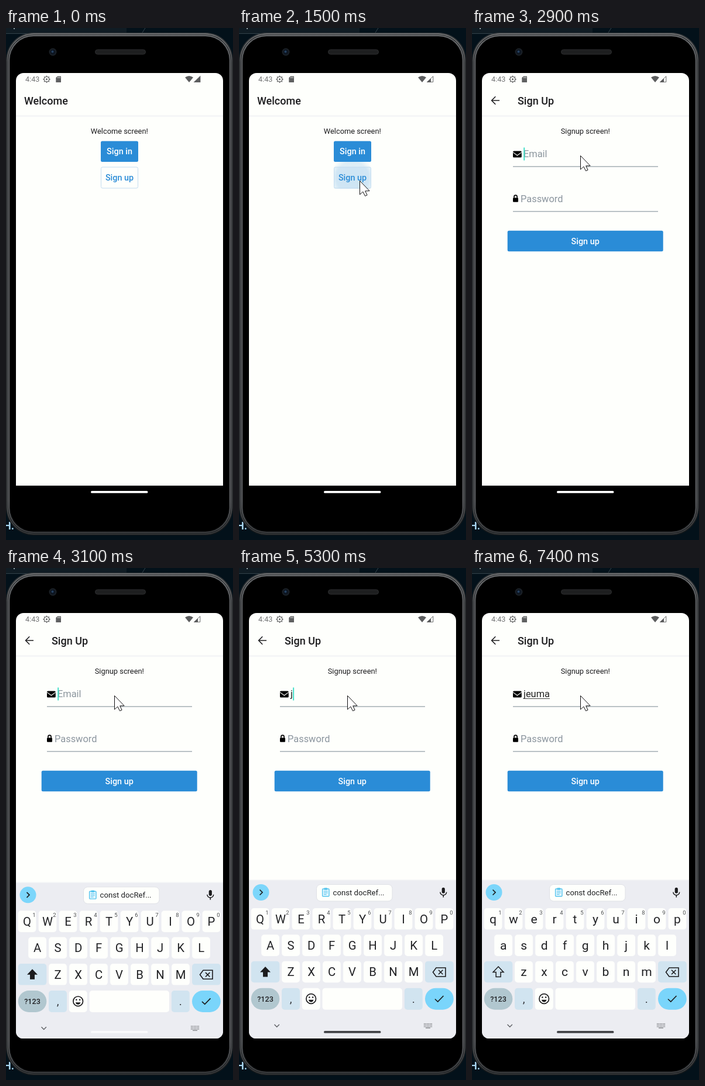
These frames come from a looping animation (388 px wide and 876 px high, 8 s). An HTML page with a canvas:

```html
<!DOCTYPE html>
<html lang="en">
<head>
<meta charset="utf-8">
<title>Phone sign-up</title>
<style>
html, body { margin: 0; width: 100%; height: 100%; overflow: hidden; background: #03111a; }
canvas { display: block; width: 388px; height: 876px; }
</style>
</head>
<body>
<canvas id="stage"></canvas>
<script>
const W = 388, H = 876, LOOP = 8000, STEP = 100;
const PAPER = '#fefffc', INK = '#1c1c1e', BLUE = '#2a8cd7', GREY = '#8b959e';
const canvas = document.getElementById('stage');
const dpr = window.devicePixelRatio || 1;
canvas.width = W * dpr;
canvas.height = H * dpr;
const c = canvas.getContext('2d');

const clamp = v => Math.max(0, Math.min(1, v));
const easeOut = p => 1 - Math.pow(1 - clamp(p), 3);
const easeInOut = p => { p = clamp(p); return p * p * (3 - 2 * p); };
const mix = (a, b, p) => a + (b - a) * p;

function box(x, y, w, h, r, fill, stroke, line = 1) {
  c.beginPath();
  c.roundRect(x, y, w, h, r);
  if (fill) { c.fillStyle = fill; c.fill(); }
  if (stroke) { c.strokeStyle = stroke; c.lineWidth = line; c.stroke(); }
}

function disc(x, y, r, fill) {
  c.beginPath();
  c.arc(x, y, r, 0, Math.PI * 2);
  c.fillStyle = fill;
  c.fill();
}

// points is a flat list x, y, x, y ...
function poly(points, { fill, stroke, line = 1.5, close = true }) {
  c.beginPath();
  for (let i = 0; i < points.length; i += 2) c.lineTo(points[i], points[i + 1]);
  if (close) c.closePath();
  if (fill) { c.fillStyle = fill; c.fill(); }
  if (stroke) { c.strokeStyle = stroke; c.lineWidth = line; c.stroke(); }
}

function text(s, x, y, size, color, { weight = 400, align = 'left' } = {}) {
  c.font = `${weight} ${size}px Roboto, sans-serif`;
  c.textAlign = align;
  c.textBaseline = 'alphabetic';
  c.fillStyle = color;
  c.fillText(s, x, y);
}

function backdrop() {
  c.fillStyle = '#03111a';
  c.fillRect(0, 0, W, H);
  c.fillStyle = '#101c24';
  c.fillRect(0, 0, 206, 9);
  poly([0, 9.5, 232, 9.5, 238, 0], { stroke: '#35434b', line: 1, close: false });
  c.fillStyle = '#8f9a9f';
  c.fillRect(13, 0, 2, 2);
  text('H.', -4, 858, 18, '#a9d5ef', { weight: 700 });
}

function phone() {
  const shell = (inset, r, fill) =>
    box(inset, 8 + inset, W - inset * 2, 860 - inset * 2, r, fill);
  const shade = (top, side, bottom) => {
    const g = c.createLinearGradient(0, 8, 0, 868);
    g.addColorStop(0, top);
    g.addColorStop(0.06, side);
    g.addColorStop(0.93, side);
    g.addColorStop(1, bottom);
    return g;
  };
  shell(0, 47, shade('#3c3f41', '#1d2022', '#16191b'));
  shell(1.5, 46, shade('#808284', '#585a5d', '#3a3d3f'));
  shell(3, 44, shade('#2a2c2e', '#202224', '#1a1c1e'));
  shell(4.2, 43, shade('#77797b', '#66686b', '#3d3f41'));
  shell(6, 41, '#0a0b0c');
  shell(7.5, 40, '#000');
  box(152.5, 37, 86, 8, 4, '#1e1f20', '#2c2d2e', 1);
  disc(80, 41, 6.5, '#1b2026');
  disc(80, 41, 4.5, '#0d1520');
  disc(79.5, 40.5, 2, '#24405f');
}

function statusBar(T) {
  const col = '#6f7071';
  text('4:43', 33, 92.3, 12.6, '#737475');
  c.strokeStyle = col;
  c.lineWidth = 1.4;
  c.beginPath();
  c.arc(69.5, 87.7, 4.3, 0, Math.PI * 2);
  c.stroke();
  for (let i = 0; i < 8; i++) {
    const a = i * Math.PI / 4, dx = Math.cos(a), dy = Math.sin(a);
    poly([69.5 + dx * 4.3, 87.7 + dy * 4.3, 69.5 + dx * 6.2, 87.7 + dy * 6.2],
      { stroke: col, line: 1.6, close: false });
  }
  disc(69.5, 87.7, 1.6, col);
  poly([88, 82.5, 94, 82.5, 94, 93, 85.3, 93, 85.3, 85.3], { fill: '#5f6061' });
  c.fillStyle = PAPER;
  for (let i = 0; i < 3; i++) c.fillRect(88 + i * 1.9, 83.8, 0.8, 2);

  c.beginPath();
  c.moveTo(313, 93);
  c.lineTo(306, 84.6);
  c.quadraticCurveTo(313, 79.4, 320, 84.6);
  c.closePath();
  c.fillStyle = '#5c5d5e';
  c.fill();
  if (T >= 1000) {
    poly([321.5, 92.4, 331.8, 92.4, 331.8, 82.6], { stroke: '#6a6b6c', line: 1 });
    poly([321, 93, 328, 93, 328, 86.2], { fill: '#5c5d5e' });
  } else {
    poly([320.6, 93, 332.4, 93, 332.4, 81.6], { fill: '#5c5d5e' });
  }
}

function header(title, x) {
  text(title, x, 131, 18, INK, { weight: 500 });
  c.fillStyle = '#f5f6f7';
  c.fillRect(17, 149, 354, 3);
}

function button(label, x, y, w, h, filled) {
  if (filled) box(x, y, w, h, 2.5, BLUE);
  else box(x + 0.5, y + 0.5, w - 1, h - 1, 2.5, null, '#c3dcf0', 1);
  text(label, x + w / 2, y + h / 2 + 5.2, 14.4, filled ? '#fff' : BLUE, { weight: 500, align: 'center' });
}

function ripple(T) {
  const r = mix(24, 38, clamp((T - 1400) / 100));
  const glow = c.createRadialGradient(194, 256, 0, 194, 256, r);
  glow.addColorStop(0, 'rgba(42,140,215,0.17)');
  glow.addColorStop(0.72, 'rgba(42,140,215,0.15)');
  glow.addColorStop(1, 'rgba(42,140,215,0)');
  c.save();
  c.beginPath();
  c.rect(162, 229, 64, 46);
  c.clip();
  disc(194, 256, r, glow);
  box(162, 238, 64, 37, 2.5, 'rgba(42,140,215,0.08)');
  c.restore();
}

function welcomeScreen(T) {
  c.fillStyle = PAPER;
  c.fillRect(17, 77, 354, 706);
  header('Welcome', 31);
  text('Welcome screen!', 193.8, 180.6, 12.85, INK, { align: 'center' });
  if (T >= 1400 && T < 2000) ripple(T);
  button('Sign in', 162, 193.5, 64, 35.5, true);
  button('Sign up', 162, 237.5, 64, 37, false);
}

function typed(T) {
  const keys = [[5200, 'j'], [5600, 'e'], [6000, 'u'], [7200, 'm'], [7300, 'a']];
  return keys.filter(k => T >= k[0]).map(k => k[1]).join('');
}

function caretOn(T) {
  if (T < 2900) return false;
  if (T < 5200) return T < 3200 || (T - 2700) % 1000 < 500;
  return T < 6400 || (T >= 7200 && T < 7400);
}

function envelope() {
  box(70, 210.6, 14.8, 11, 1.6, '#000');
  poly([70, 212.6, 77.4, 218, 84.8, 212.6], { stroke: PAPER, line: 1.1, close: false });
}

function padlock() {
  box(70, 290.5, 9, 7.2, 1.2, '#000');
  c.beginPath();
  c.moveTo(71.9, 291);
  c.lineTo(71.9, 288.7);
  c.arc(74.5, 288.7, 2.6, Math.PI, 0);
  c.lineTo(77.1, 291);
  c.strokeStyle = '#000';
  c.lineWidth = 1.6;
  c.stroke();
}

function signupScreen(T) {
  c.fillStyle = PAPER;
  c.fillRect(17, 77, 354, 706);
  header('Sign Up', 78);
  poly([47, 124, 33.6, 124], { stroke: INK, line: 1.6, close: false });
  poly([40.2, 117.3, 33.6, 124, 40.2, 130.7], { stroke: INK, line: 1.6, close: false });
  text('Signup screen!', 193.8, 180.6, 12.85, INK, { align: 'center' });

  envelope();
  padlock();
  const value = typed(T);
  text(value || 'Email', 88, 221.4, 16.4, value ? '#222' : GREY);
  const end = value ? 88 + c.measureText(value).width : 88;
  if (T >= 5600) {
    c.fillStyle = '#444';
    c.fillRect(88, 223, end - 88, 1);
  }
  if (caretOn(T)) {
    c.fillStyle = '#45dfc9';
    c.fillRect(end + 0.2, 204.5, 2, 22);
  }
  text('Password', 83, 297.8, 16.4, GREY);
  c.fillStyle = '#8f9ba3';
  c.fillRect(70, 236.5, 248, 1.2);
  c.fillRect(70, 313.3, 248, 1.2);
  button('Sign up', 60.7, 346.7, 266, 35.5, true);
}

function letterRow(letters, x, y, lower, digits) {
  [...letters].forEach((ch, i) => {
    const cx = x + i * 35;
    box(cx - 15.4, y - 18.3, 30.8, 36.6, 5, PAPER);
    text(lower ? ch.toLowerCase() : ch, cx, y + 7.2, lower ? 21 : 20.3, '#202124', { align: 'center' });
    if (digits) text(String((i + 1) % 10), cx + 11.8, y - 7.5, 9.5, '#4a4c50', { align: 'center' });
  });
}

function suggestionRow() {
  disc(37.5, 555, 14, '#7cd6fb');
  poly([35.5, 550.5, 40, 555, 35.5, 559.5], { stroke: INK, line: 1.7, close: false });
  box(132.5, 541.5, 129.5, 28.5, 7, PAPER, '#dfe1e6', 1);
  box(142.6, 549, 11.4, 12.8, 1, '#e2f6fe', '#57c5ee', 1.4);
  box(145.4, 547.2, 5.8, 3.6, 1, '#57c5ee');
  for (let i = 0; i < 3; i++) {
    c.fillStyle = '#57c5ee';
    c.fillRect(145, 552.6 + i * 2.7, i === 2 ? 4.5 : 6.6, 1.1);
  }
  text('const docRef...', 160.5, 559.8, 13.2, '#202124');
  box(346.7, 546.8, 5.2, 9.8, 2.6, INK);
  c.beginPath();
  c.arc(349.3, 554.4, 5.4, 0, Math.PI);
  c.strokeStyle = INK;
  c.lineWidth = 1.5;
  c.stroke();
  poly([349.3, 559.5, 349.3, 563.5], { stroke: INK, line: 1.6, close: false });
}

function specialKeys(lower) {
  const tint = '#d1e4f0';
  box(20.7, 672.7, 48.6, 36.6, 5, tint);
  const arrow = [45, 682, 54, 691.5, 49, 691.5, 49, 699.5, 41, 699.5, 41, 691.5, 36, 691.5];
  poly(arrow, lower ? { stroke: INK, line: 1.5 } : { fill: INK });
  box(318, 672.7, 48.8, 36.6, 5, tint);
  poly([331.5, 691.5, 337, 684, 353, 684, 353, 699, 337, 699], { stroke: INK, line: 1.6 });
  poly([341, 687.8, 348.4, 695.2], { stroke: INK, line: 1.6, close: false });
  poly([348.4, 687.8, 341, 695.2], { stroke: INK, line: 1.6, close: false });

  box(20.7, 718.7, 48.6, 37, 18.5, '#b1c7cf');
  text('?123', 45, 742, 12.6, '#202124', { align: 'center', weight: 500 });
  box(73, 718.7, 31, 37, 5, tint);
  text(',', 88.5, 744, 19, '#303236', { align: 'center' });
  box(107.7, 718.7, 31, 37, 5, PAPER);
  c.beginPath();
  c.arc(123.2, 737, 8.3, 0, Math.PI * 2);
  c.strokeStyle = INK;
  c.lineWidth = 1.7;
  c.stroke();
  c.beginPath();
  c.arc(123.2, 738.2, 4.3, 0.15, Math.PI - 0.15);
  c.closePath();
  c.fillStyle = INK;
  c.fill();
  disc(120.3, 734.5, 1.3, INK);
  disc(126.1, 734.5, 1.3, INK);
  box(142.5, 718.7, 136.5, 37, 5, PAPER);
  box(282.8, 718.7, 31, 37, 5, tint);
  text('.', 298.3, 744, 19, '#303236', { align: 'center' });
  box(318, 718.7, 48.8, 37, 18.5, '#7ad5fb');
  poly([335, 737.5, 339.8, 742, 349.5, 732], { stroke: INK, line: 1.7, close: false });
}

function navIcons() {
  poly([60.5, 781, 64.7, 785.2, 68.9, 781], { stroke: '#606266', line: 1.4, close: false });
  c.fillStyle = '#808286';
  for (let r = 0; r < 3; r++) {
    for (let i = 0; i < 6; i++) c.fillRect(316 + i * 2.5, 779 + r * 2.5, 1.5, 1.5);
  }
  c.fillRect(319, 786.3, 8, 1.3);
}

function keyboard(T) {
  if (T < 3000) return;
  const shift = T < 3100 ? 46 : T < 3200 ? 4.3 : 0;
  const lower = T >= 5400;
  c.save();
  c.beginPath();
  c.roundRect(17, 500, 354, 305, [0, 0, 12, 12]);
  c.clip();
  c.fillStyle = '#ecedf2';
  c.fillRect(17, 782, 354, 24);
  c.translate(0, shift);
  c.fillStyle = '#f5f6f7';
  c.fillRect(17, 533, 354, 2);
  c.fillStyle = '#ecedf2';
  c.fillRect(17, 534.5, 354, 275);
  suggestionRow();
  letterRow('QWERTYUIOP', 36, 600.3, lower, true);
  letterRow('ASDFGHJKL', 53.6, 645.6, lower);
  letterRow('ZXCVBNM', 88.5, 691, lower);
  specialKeys(lower);
  navIcons();
  c.restore();
}

function screen(T) {
  c.save();
  c.beginPath();
  c.roundRect(17, 77, 354, 706, [13, 13, 0, 0]);
  c.clip();
  if (T < 1600) {
    welcomeScreen(T);
  } else {
    const p = (T - 1570) / 450;
    const scale = mix(0.85, 1, easeOut(p));
    if (p < 1) {
      welcomeScreen(T);
      c.fillStyle = `rgba(238,238,239,${clamp(p * 3)})`;
      c.fillRect(17, 77, 354, 706);
    }
    c.globalAlpha = clamp(p * 3.2);
    c.translate(194, 430);
    c.scale(scale, scale);
    c.translate(-194, -430);
    signupScreen(T);
  }
  c.restore();
  statusBar(T);
}

function pointer(T) {
  if (T < 500) return;
  const a = easeInOut((T - 400) / 900);
  const b = easeInOut((T - 2400) / 300);
  const x = mix(mix(388, 206.5, a), 185.5, b);
  const y = mix(mix(30, 261.5, a), 218.5, b);
  c.save();
  c.translate(x, y);
  c.lineJoin = 'miter';
  poly([0, 0, 0, 23.5, 5.3, 18.6, 9, 26, 12.6, 24.4, 9.2, 17.4, 16.6, 17.2],
    { fill: '#fff', stroke: '#111', line: 1 });
  c.restore();
}

function draw(now) {
  const T = Math.floor((now % LOOP) / STEP) * STEP;
  c.setTransform(dpr, 0, 0, dpr, 0, 0);
  backdrop();
  phone();
  screen(T);
  keyboard(T);
  const pill = T < 3000 ? '#fff' : T < 3300 ? '#fafafc' : '#424347';
  box(145, 792, 97.5, 3.8, 1.9, pill);
  pointer(T);
}

let start = null;
function tick(now) {
  if (start === null) start = now;
  draw(now - start);
  requestAnimationFrame(tick);
}
draw(0);
requestAnimationFrame(tick);
</script>
</body>
</html>
```
